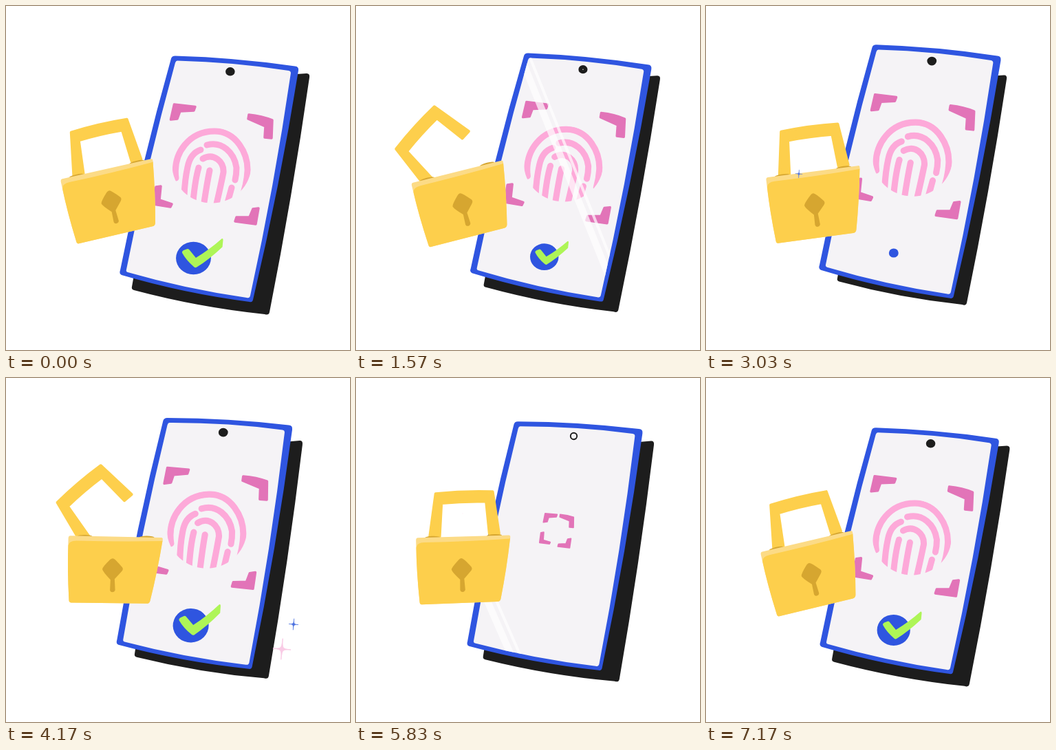
Animation of 500x500 px, one loop 7210 ms. Source, as an HTML page with a canvas:

```html
<!DOCTYPE html>
<html lang="en">
<head>
<meta charset="utf-8">
<title>Phone unlock</title>
<style>
  html, body { margin: 0; width: 100%; height: 100%; overflow: hidden; background: #fff; }
  canvas { display: block; width: 100vmin; height: 100vmin; }
</style>
</head>
<body>
<canvas width="500" height="500"></canvas>
<script>
const ctx = document.querySelector('canvas').getContext('2d');
const LOOP = 7210, CYCLE = 3600, SWAY = 1800;
const BLUE = '#2f55e0', SCREEN = '#f5f3f6', YELLOW = '#fdcf4c', GOLD = '#d6a630',
      ROSE = '#e274b8', PINK = '#fda9d9', LIME = '#aef557', INK = '#1d1d1d';

const path = d => new Path2D(d);
const shadow = path('M262 110 L437 98 Q442 98 441 104 Q416 278 383 445 Q382 450 376 448 Q280 438 186 413 Q182 412 183 408 L188 380Z');
const phone = path('M246 72.5 Q334 75 420 87.5 Q426 88 425 94 Q398 262 359 427 Q358 431 354 430 Q258 417.5 168 391 Q164 389 166 384 Q197 228 240 76.5 Q241 72.5 246 72.5Z');
const screen = path('M249 79.5 Q332 81.5 411 94 Q414 94.5 414 97.5 Q390 262 355 421 Q354 425 350 424 Q262 411.5 177 387 Q174 386 175 383 Q204 235 246 82.5 Q247 79.5 249 79.5Z');
const tick = path('M256 359 Q255 357 258 355 L263 353 Q265 352 267 355 L276 366 Q296 354 314 338 Q316 337 316 340 L315 350 Q296 368 277 380 Q275 381 273 379 Q262 370 256 359Z');
const printArea = new Path2D();
printArea.ellipse(299, 231.5, 57.5, 55, 0, 0, 7);

const ridges = [
  'M247 250 C242 212 268 182 303 182 C335 182 352 215 351 240 Q350 260 342 280',
  'M259 276 Q260 252 264 234 Q268 214 283 209',
  'M292 202 C314 196 332 213 335 235 Q335 245 333 253',
  'M328 264 L322 286',
  'M280 235 Q275 252 272 284',
  'M286 222 C302 213 317 226 316 242 Q312 262 305 292',
  'M296 239 Q292 258 287 292'
].map(path);

// Outer corner of each bracket, then its outline.
const brackets = [
  [243, 141, 'M244.5 143 L275 146.5 L273 152 L253 153 L249 164 L239.5 165Z'],
  [388, 165, 'M353 158 Q372 160 387 166 L386 192 L376 191 L377 175 L352 164Z'],
  [363, 318, 'M359 295 L367 294 L363 317 L333 313 L335 307 L354 307Z'],
  [213, 289, 'M218 263 L225 262 L223 282 L241 288 L239 292 L214 288Z']
].map(([x, y, d]) => [x, y, path(d)]);

const bodyRest = 'L72 -43 Q65 3 55 45 Q54 49 50 49 L-60 49 Q-63 49 -63 45 Q-66 0 -65 ';
const band = path('M-62 -48 L70 -47 Q73 -47 72 -43 ' + bodyRest + '-44 Q-65 -48 -62 -48Z');
const body = path('M-65 -34 Q-64 -41 -53 -41 Q10 -40 71 -42 ' + bodyRest + '-34Z');
const keyhole = path('M0 -16 Q3 -16 14 -3 Q16 0 13 3 L3 14 L4 30 Q3 33 0 33 Q-3 33 -3.5 30 L-3 15 Q-14 4 -15 0 Q-15 -3 -4 -14 Q-2 -16 0 -16Z');
const shackle = path('M-46 -42 L-34 -111 Q8 -114 49 -111 L56 -50 L42 -50 L39 -97 Q6 -99 -26 -97 L-31 -42Z');
const star = path('M0 -1 C.04 -.04 .04 -.04 .85 0 C.04 .04 .04 .04 0 1 C-.04 .04 -.04 .04 -.85 0 C-.04 -.04 -.04 -.04 0 -1Z');

// Smooth keyframes: time, value, time, value, ...
function key(t, ...k) {
  if (t <= k[0]) return k[1];
  for (let i = 2; i < k.length; i += 2) {
    if (t < k[i]) {
      const x = (t - k[i - 2]) / (k[i] - k[i - 2]);
      return k[i - 1] + (k[i + 1] - k[i - 1]) * x * x * (3 - 2 * x);
    }
  }
  return k[k.length - 1];
}

function group(draw) {
  ctx.save();
  draw();
  ctx.restore();
}

function fill(shape, color, round = 0) {
  ctx.fillStyle = ctx.strokeStyle = color;
  ctx.fill(shape);
  if (round) {
    ctx.lineWidth = round;
    ctx.stroke(shape);
  }
}

function disc(x, y, rx, ry, color) {
  ctx.fillStyle = color;
  ctx.beginPath();
  ctx.ellipse(x, y, rx, ry, 0, 0, 7);
  ctx.fill();
}

function scaleAt(x, y, s) {
  ctx.translate(x, y);
  ctx.scale(s, s);
  ctx.translate(-x, -y);
}

// Tilts a slab; xs and ys hold cosine and sine weights of shift, change across, change down.
function tilt(q, cx, cy, xs, ys) {
  const A = Math.cos(q) - 1, B = Math.sin(q);
  const mix = w => [0, 2, 4].map(i => w[i] * A + w[i + 1] * B);
  const [x, xu, xv] = mix(xs), [y, yu, yv] = mix(ys);
  const ux = .005226, uy = .001147, vx = -.000462, vy = .002947;
  ctx.translate(cx + x, cy + y);
  ctx.transform(1 + xu * ux + xv * vx, yu * ux + yv * vx, xu * uy + xv * vy, 1 + yu * uy + yv * vy, 0, 0);
  ctx.translate(-cx, -cy);
}

function drawShine(t) {
  ctx.clip(screen);
  ctx.rotate(-22.5 * Math.PI / 180);
  const x = 311 - (t - 930) * .2;
  ctx.fillStyle = 'rgba(255,255,255,.7)';
  ctx.fillRect(x, -100, 10, 800);
  ctx.fillRect(x + 15, -100, 4, 800);
}

function drawPrint(t) {
  const p = key(t, 1500, 1, 1780, 0, 2350, 0, 2880, 1);
  if (p <= 0) return;
  ctx.clip(printArea);
  ctx.strokeStyle = PINK;
  ctx.lineWidth = 9;
  ctx.lineCap = 'round';
  if (p < 1) ctx.setLineDash([250 * p, 500]);
  ridges.forEach(r => ctx.stroke(r));
}

function drawBrackets(t) {
  const s = key(t, 1650, 1, 1950, 0, 2110, 0, 2450, 1);
  if (s <= 0) return;
  // Each bracket grows faster than the square they mark out.
  const cx = 297, cy = 229, k = s * (2.3 - 1.3 * s);
  for (const [x, y, shape] of brackets) group(() => {
    ctx.translate(cx + (x - cx) * s, cy + (y - cy) * s);
    ctx.scale(k, k);
    ctx.translate(-x, -y);
    fill(shape, ROSE, 3.5);
  });
}

function drawTick(t) {
  const s = key(t, 0, .99, 60, 1, 1500, 1, 1750, 0, 2940, 0, 3220, 1.08, 3540, .92, 3640, 1);
  if (s <= 0) return;
  scaleAt(272.5, 366.5, s);
  disc(272.5, 366.5, 25.7, 24, BLUE);
  const p = t < 2000 ? 1 : key(t, 3080, 0, 3350, 1);
  ctx.beginPath();
  ctx.rect(250, 330, 70 * p, 60);
  ctx.clip();
  fill(tick, LIME);
}

function drawPhone(t, q) {
  group(() => {
    tilt(q, 312, 255, [.4, -2.75, 5.6, 3.3, -3.6, 4.4], [4.3, -1.15, 1.9, -1.6, 6.9, 6.1]);
    fill(shadow, INK);
  });
  group(() => {
    tilt(q, 298, 245.5, [1.925, -4.3, -1.75, .55, -1.75, 5.5], [7.8, 0, 1, -3.25, -7.4, 1.15]);
    fill(phone, BLUE);
    fill(screen, SCREEN);
    const hole = key(t, 1500, 0, 1750, 1, 2230, 1, 2480, 0);
    disc(325.9, 95.3, 6.8 - 1.2 * hole, 6.2 - .6 * hole, INK);
    if (hole > 0) disc(325.9, 95.3, 3.7 * hole, 3.7 * hole, SCREEN);
    for (const part of [drawBrackets, drawPrint, drawTick, drawShine]) group(() => part(t));
  });
}

function drawLock(t, q) {
  const wave = deg => Math.cos(q - deg * Math.PI / 180);
  ctx.translate(155.5 + 2.8 * wave(214), 283.4 + 5.5 * wave(276));
  ctx.rotate((-6.3 + 8.3 * wave(146)) * Math.PI / 180);
  group(() => {
    const open = key(t, 150, 0, 480, 42, 900, 35, 1530, 35, 1850, 0);
    ctx.translate(-38, -40);
    ctx.rotate(-open * Math.PI / 180);
    ctx.translate(38, 40);
    fill(shackle, YELLOW, 4);
  });
  disc(-41, -47.5, 11, 2.2, GOLD);
  disc(49, -47, 11, 2.2, GOLD);
  fill(band, '#fcdb86');
  fill(body, YELLOW);
  fill(keyhole, GOLD);
}

function sparkle(x, y, size, color) {
  if (size > 0) group(() => {
    ctx.translate(x, y);
    ctx.rotate(.08);
    ctx.scale(size, size);
    fill(star, color, .06);
  });
}

function frame(now) {
  const t = now % LOOP % CYCLE, q = t / SWAY * 2 * Math.PI;
  ctx.clearRect(0, 0, 500, 500);
  ctx.lineJoin = 'round';
  drawPhone(t, q);
  group(() => drawLock(t, q));
  sparkle(401, 394, 15.5 * key(t, 200, 0, 550, 1, 900, 0), '#f9cbe5');
  sparkle(418, 358, 8.5 * key(t, 300, 0, 600, 1, 1100, 0), '#4a70e0');
  sparkle(155, 197, 15.5 * key(t, 2180, 0, 2550, 1, 2900, 0), '#f9cbe5');
  sparkle(135, 244, 7 * key(t, 2650, 0, 2950, 1, 3300, 0), '#4a70e0');
  requestAnimationFrame(frame);
}
requestAnimationFrame(frame);
</script>
</body>
</html>
```
